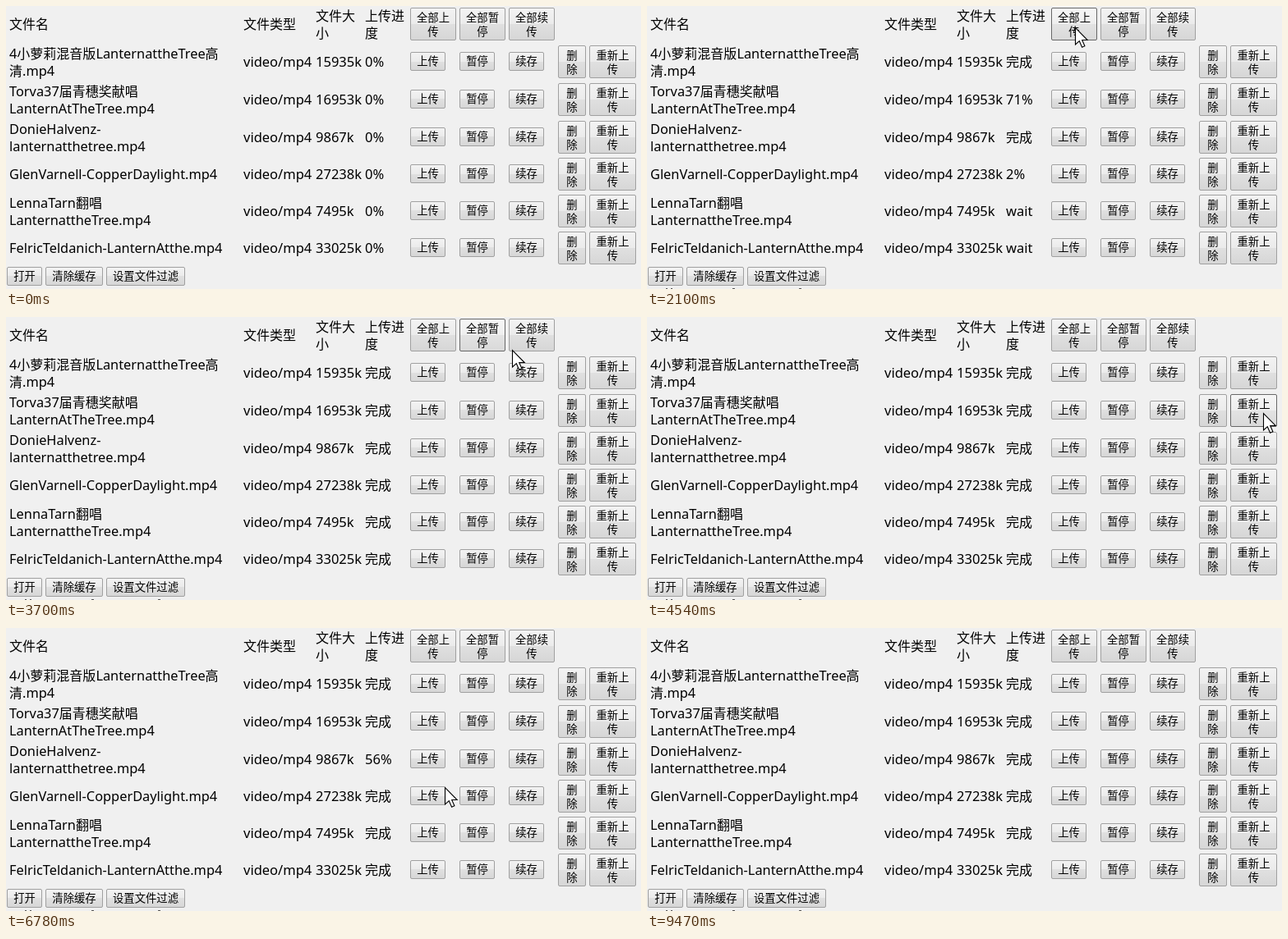
An HTML page for the animation above (9.52 s loop, 773x345 px).

```html
<!DOCTYPE html>
<html lang="zh-CN">
<head>
<meta charset="utf-8">
<title>上传列表</title>
<style>
html, body { margin: 0; width: 100%; height: 100%; overflow: hidden; background: #f0f0f0; }
svg { display: block; }
text { font-family: "Noto Sans CJK SC", "Noto Sans CJK", sans-serif; font-size: 16px; fill: #000; }
.latin { font-family: "Noto Sans", sans-serif; font-size: 16.5px; }
.name .latin { font-size: 16.35px; }
.btn text { font-size: 13.33px; text-anchor: middle; }
.btn rect { fill: url(#face); stroke: #a0a0a0; }
.btn.hot rect { fill: url(#hotFace); stroke: #686868; }
</style>
</head>
<body>
<svg id="stage" width="773" height="345" viewBox="0 0 773 345">
  <defs>
    <linearGradient id="face" x2="0" y2="1">
      <stop offset="0" stop-color="#f3f3f3"/><stop offset=".5" stop-color="#ebebeb"/>
      <stop offset=".5" stop-color="#e0e0e0"/><stop offset="1" stop-color="#d6d6d6"/>
    </linearGradient>
    <linearGradient id="hotFace" x2="0" y2="1">
      <stop offset="0" stop-color="#f6f6f6"/><stop offset=".5" stop-color="#eee"/>
      <stop offset=".5" stop-color="#e3e3e3"/><stop offset="1" stop-color="#d9d9d9"/>
    </linearGradient>
  </defs>
</svg>
<script>
const LOOP = 9520, STEP = 100, EXIT = 9470;
const HOVER_LAG = 80, TRAVEL = 350, SETTLE = 100;
const LANES = [33, 15.1]; // two parallel uploads, k per ms
const stage = document.getElementById('stage');

function add(parent, tag, attrs) {
  const el = document.createElementNS('http://www.w3.org/2000/svg', tag);
  for (const k in attrs) el.setAttribute(k, attrs[k]);
  parent.appendChild(el);
  return el;
}

function setText(el, str) {
  if (el.textContent === str) return;
  el.textContent = '';
  for (const run of str.match(/[\x20-\x7e]+|[^\x20-\x7e]+/g)) {
    add(el, 'tspan', /[\x20-\x7e]/.test(run) ? { class: 'latin' } : {}).textContent = run;
  }
}

// One or two lines, centred vertically on cy
function label(str, x, cy, cls = '') {
  const lines = str.split('|');
  return lines.map((line, i) => {
    const y = lines.length === 1 ? cy + 6 : cy - 4 + i * 21;
    const el = add(stage, 'text', { x, y, class: cls });
    setText(el, line);
    return el;
  })[0];
}

const buttons = [];
function button(str, x, cy, w, act, targets) {
  const lines = str.split('|'), tall = lines.length > 1;
  const h = tall ? 40 : 23, y = cy - (tall ? 20 : 12);
  const el = add(stage, 'g', { class: 'btn' });
  add(el, 'rect', { x: x + 0.5, y: y + 0.5, width: w - 1, height: h - 1, rx: 1.5 });
  lines.forEach((line, i) => {
    add(el, 'text', { x: x + w / 2, y: y + (tall ? 17 + i * 17 : 16) }).textContent = line;
  });
  buttons.push({ el, x, y, w, h, act, targets });
}

const rows = [
  ['4小萝莉混音版LanternattheTree高|清.mp4', 15935],
  ['Torva37届青穗奖献唱|LanternAtTheTree.mp4', 16953],
  ['DonieHalvenz-|lanternatthetree.mp4', 9867],
  ['GlenVarnell-CopperDaylight.mp4', 27238],
  ['LennaTarn翻唱|LanternattheTree.mp4', 7495],
  ['FelricTeldanich-LanternAtthe.mp4', 33025]
].map(([name, size], i) => ({
  name, size, cy: 68 + 45 * i + Math.min(i, 2),
  jobs: [{ at: 0, start: 0, done: 0, rate: 0 }]
}));

const ACTS = ['upload', 'pause', 'upload'];
const trio = (captions, cy, w, targets) =>
  captions.forEach((s, i) => button(s, 492 + i * 60, cy, w, ACTS[i], targets));

label('文件名', 4, 22);
label('文件类型', 289, 22);
label('文件大|小', 377, 22);
label('上传进|度', 437, 22);
trio(['全部上|传', '全部暂|停', '全部续|传'], 22, 56, rows);

for (const row of rows) {
  label(row.name, 4, row.cy, 'name');
  label('video/mp4', 289, row.cy);
  label(row.size + 'k', 377, row.cy);
  row.out = label('0%', 437, row.cy);
  trio(['上传', '暂停', '续存'], row.cy, 43, [row]);
  button('删|除', 672, row.cy, 34);
  button('重新上|传', 710, row.cy, 57, 'redo', [row]);
}
button('打开', 1, 330, 43);
button('清除缓存', 48, 330, 70);
button('设置文件过滤', 122, 330, 96);

// Tops of a text line cut off by the lower edge
const cutLine = add(stage, 'path', { d: 'M23 344.5h2m4 0h2m73 0h3m78 0h3', stroke: '#555' });

const pointer = add(stage, 'path', {
  d: 'M0 0V20.5L4.8 16.2L8.1 23.8L11.4 22.3L8.2 15H14.7Z',
  fill: '#fff', stroke: '#000', 'stroke-width': 1.1
});

// The visit: time, place, upload speed; a stop on a button clicks it
const visit = [
  { t: 0, x: 115, y: 330 },
  { t: 600, x: 744, y: 25 },
  { t: 1300, x: 521, y: 27, speed: 1 },
  { t: 2550, x: 580, y: 25 },
  { t: 2950, x: 519, y: 22, speed: 2 },
  { t: 4000, x: 745, y: 66, speed: 1.2 },
  { t: 4550, x: 750, y: 118, speed: 1.2 },
  { t: 5500, x: 735, y: 163, speed: 0.15 },
  { t: 5950, x: 560, y: 163 },
  { t: 6500, x: 515, y: 160, speed: 0.5 },
  { t: 6900, x: 543, y: 212 },
  { t: 7820, x: 727, y: 207, speed: 0.5 },
  { t: 8300, x: 575, y: 205 },
  { t: 8700, x: 628, y: 205, speed: 2 },
  { t: EXIT, x: 363, y: 309 }
];

const inside = (b, x, y) => x >= b.x && x < b.x + b.w && y >= b.y && y < b.y + b.h;
const lastAt = (list, t, key) => list.findLast(e => e[key] <= t) || list[0];
const mix = (a, b, k) => a + (b - a) * k;

function doneAt(row, t) {
  const j = lastAt(row.jobs, t, 'at');
  return Math.min(row.size, j.done + Math.max(0, t - j.start) * j.rate);
}

// Each upload waits for the lane that is free first
function click({ act, targets }, t, speed) {
  const free = LANES.map(() => t);
  for (const row of targets) {
    const done = act === 'redo' ? 0 : doneAt(row, t);
    if (act === 'pause') {
      row.jobs.push({ at: t, start: t, done, rate: 0, word: 'stop' });
      continue;
    }
    const start = Math.min(...free), lane = free.indexOf(start);
    const rate = LANES[lane] * speed;
    free[lane] += (row.size - done) / rate;
    row.jobs.push({ at: t, start, done, rate });
  }
}

for (const { t, x, y, speed } of visit) {
  const hit = buttons.find(b => b.act && inside(b, x, y));
  if (hit) click(hit, t, speed);
}

function statusAt(row, t) {
  const job = lastAt(row.jobs, t, 'at');
  if (job.word) return job.word;
  if (t < job.start) return 'wait';
  const pct = Math.floor(doneAt(row, t) / row.size * 100);
  return pct === 100 ? '完成' : pct + '%';
}

// Rest at each stop, then travel and settle shortly before the next click
function pointerAt(t) {
  const a = lastAt(visit, t, 't'), b = visit[visit.indexOf(a) + 1] || a;
  const end = b.t - SETTLE, begin = Math.max(a.t, end - TRAVEL);
  const k = Math.min(1, Math.max(0, (t - begin) / (end - begin)));
  return [mix(a.x, b.x, k), mix(a.y, b.y, k)];
}

function draw(ms) {
  const t = ms % LOOP, q = Math.floor(t / STEP) * STEP;
  const shown = t >= STEP && t < EXIT;
  const [x, y] = pointerAt(q).map(Math.round);
  pointer.setAttribute('transform', `translate(${x + 0.5} ${y - 0.5})`);
  pointer.setAttribute('visibility', shown ? 'visible' : 'hidden');
  cutLine.setAttribute('visibility', t >= 1500 ? 'visible' : 'hidden');

  const [hx, hy] = pointerAt(q - HOVER_LAG);
  for (const b of buttons) {
    b.el.setAttribute('class', shown && inside(b, hx, hy) ? 'btn hot' : 'btn');
  }
  for (const row of rows) setText(row.out, statusAt(row, q));
}

let start;
function tick(now) {
  if (start === undefined) start = now;
  draw(now - start);
  requestAnimationFrame(tick);
}
draw(0);
requestAnimationFrame(tick);
</script>
</body>
</html>
```
